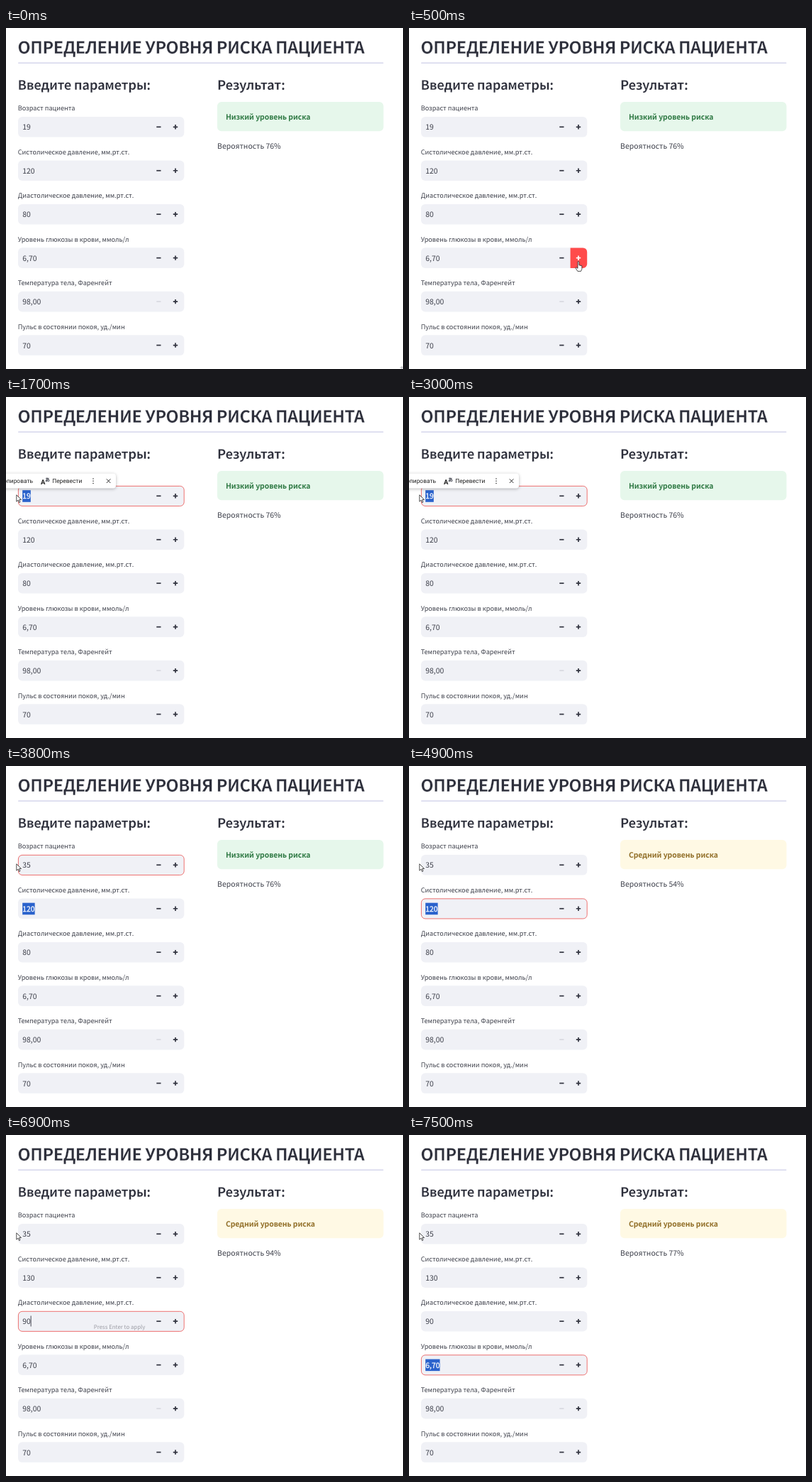
Recreate the animation shown at these times as an HTML page. Size 560x480 px, loop 8000 ms.

```html
<!DOCTYPE html>
<html lang="ru">
<head>
<meta charset="utf-8">
<title>Определение уровня риска</title>
<style>
html, body { margin: 0; width: 100%; height: 100%; overflow: hidden; background: #fff; }
svg { display: block; width: 560px; height: 480px; }
text {
  font: 10.48px "Noto Sans CJK SC", "Noto Sans CJK JP", "Noto Sans CJK", "Open Sans", sans-serif;
  fill: #3e404b; text-rendering: geometricPrecision; white-space: pre;
}
/* the thin white outline slims bold down to semibold */
.title, .head { font-weight: 600; fill: #2d2f3b; stroke: #fff; stroke-width: .3; }
.title { font-size: 23.55px; letter-spacing: -.0197em; }
.head { font-size: 18.35px; letter-spacing: -.0215em; }
.strong { font-weight: 600; letter-spacing: -.008em; }
.label { font-size: 9.17px; }
.hint { font-size: 7.85px; fill: #9c9da5; text-anchor: end; }
.menu { font: 8.4px Roboto, "Liberation Sans", sans-serif; fill: #222; }
.end { text-anchor: end; }
.sign { stroke: #31333f; stroke-width: 1.7; fill: none; }
.off { stroke: #d9dae0; }
.box { fill: #f0f1f6; }
.focus { fill: none; stroke: #ee6463; stroke-width: .9; }
.sel { fill: #2a62cc; }
.picked { fill: #fff; stroke: #fff; stroke-width: .25; }
.caret { stroke: #31333f; stroke-width: .9; }
.bar { filter: drop-shadow(0 1px 2px rgba(0, 0, 0, .28)); }
</style>
</head>
<body>
<svg id="stage" viewBox="0 0 560 480">
  <text class="title" x="16.6" y="36">ОПРЕДЕЛЕНИЕ УРОВНЯ РИСКА ПАЦИЕНТА</text>
  <rect x="17" y="48.4" width="515.5" height="1.7" rx=".8" fill="#d5d6ec"/>
  <text class="head" x="16.6" y="87">Введите параметры:</text>
  <text class="head" x="298" y="87">Результат:</text>
  <rect id="card" x="298" y="104" width="234.5" height="41.2" rx="5.8"/>
  <text id="level" class="strong" x="309.9" y="129"></text>
  <text id="odds" x="298" y="170"></text>
  <g id="fields"></g>

  <rect id="sel" class="sel" x="23.2" height="16.6"/>
  <text id="selText" class="picked" x="23.2"></text>
  <rect id="focus" class="focus" x="17.4" width="233.8" height="28.1" rx="5.6"/>
  <path id="caret" class="caret"/>
  <text id="hint" class="hint" x="196.4">Press Enter to apply</text>

  <g id="hover">
    <path d="M227.6 309.4h17.8a5.8 5.8 0 0 1 5.8 5.8v17a5.8 5.8 0 0 1 -5.8 5.8h-17.8z" fill="#ff4b4b"/>
    <path class="sign" style="stroke:#fff" d="M235.8 323.7h6.4m-3.2 -3.2v6.4"/>
  </g>

  <g id="menu">
    <rect class="bar" x="-60" y="107.8" width="215" height="20.7" rx="4" fill="#fff"/>
    <text class="menu end" x="38" y="121">Копировать</text>
    <text class="menu" x="65.2" y="121">Перевести</text>
    <text class="menu" x="49" y="123.4" style="font-size:9.5px;font-weight:700">A</text>
    <text x="55" y="119" style="font-size:7px;font-weight:700">あ</text>
    <g fill="#222"><circle cx="123" cy="115" r=".75"/><circle cx="123" cy="118.2" r=".75"/><circle cx="123" cy="121.4" r=".75"/></g>
    <path d="M141.8 115.4l5.6 5.6m0 -5.6l-5.6 5.6" stroke="#222" stroke-width=".95"/>
  </g>

  <path id="corner" d="M555.8 478h4.2M558.2 475.8v4.2" stroke="#a5a6ab" stroke-width=".8"/>
  <path id="beam" d="M-2.3 -5h1.6l.7 .6l.7 -.6h1.6M0 -4.4v8.8M-2.3 5h1.6l.7 -.6l.7 .6h1.6" fill="none" stroke="#444" stroke-width=".85"/>
  <path id="hand" d="M0 0c1.2 -1.2 1.9 0 1.9 .8v4l4 1v4.6l-1.4 3h-4.6l-3 -4.6c0 -1.4 1.6 -1 3.1 .6z" fill="#fff" stroke="#222" stroke-width=".8"/>
  <path id="arrow" d="M0 0v9.4l2.2 -2l1.5 3.4l1.5 -.7l-1.5 -3.3h3z" fill="#fff" stroke="#222" stroke-width=".8"/>
</svg>
<script>
const LOOP = 8000;
const $ = id => document.getElementById(id);
const rowTop = i => 125 + 61.45 * i;
const labels = [
  "Возраст пациента", "Систолическое давление, мм.рт.ст.",
  "Диастолическое давление, мм.рт.ст.", "Уровень глюкозы в крови, ммоль/л",
  "Температура тела, Фаренгейт", "Пульс в состоянии покоя, уд./мин"
];

$("fields").innerHTML = labels.map((label, i) => {
  const y = rowTop(i), mid = y + 14.3;
  return `<text class="label" x="16.7" y="${y - 8.6}">${label}</text>
    <rect class="box" x="17" y="${y}" width="234.3" height="28.6" rx="5.8"/>
    <text class="value" x="23.2" y="${y + 18.4}"></text>
    <path class="sign ${i === 4 ? "off" : ""}" d="M212.3 ${mid}h6.2"/>
    <path class="sign" d="M235.8 ${mid}h6.4m-3.2 -3.2v6.4"/>`;
}).join("");
const values = [...document.querySelectorAll(".value")];

const LOW = ["Низкий уровень риска", "#e6f7eb", "#307a45"];
const MID = ["Средний уровень риска", "#fff9e4", "#92702a"];

const start = {
  age: "19", sys: "120", dia: "80", sugar: "6,70", temp: "98,00", pulse: "70",
  level: LOW, odds: 76, focus: -1, sel: -1, hint: -1, caret: 0,
  menu: 0, hover: 0, cursor: "corner", at: [0, 0]
};

// Each step: time in ms and what changes then
const steps = [
  [400, { cursor: "hand", at: [238, 329], hover: 1 }],
  [700, { cursor: "beam", at: [110, 230], hover: 0 }],
  [800, { at: [70.5, 185] }],
  [1000, { at: [41.5, 146] }],
  [1200, { at: [37.2, 140.5] }],
  [1700, { cursor: "arrow", at: [14.8, 137.8], focus: 0, sel: 0, menu: 1 }],
  [3200, { age: "35", sel: -1, menu: 0, hint: 0, caret: 1 }],
  [3500, { caret: 0 }],
  [3800, { hint: -1, sel: 1 }],
  [4300, { focus: 1 }],
  [4400, { level: MID, odds: 54 }],
  [5600, { sys: "1", sel: -1, hint: 1, caret: 1 }],
  [5700, { sys: "130" }],
  [6000, { hint: -1, caret: 0, sel: 2 }],
  [6100, { focus: 2 }],
  [6300, { odds: 94 }],
  [6900, { dia: "90", sel: -1, hint: 2, caret: 1 }],
  [7300, { hint: -1, caret: 0, sel: 3 }],
  [7400, { focus: 3 }],
  [7500, { odds: 77 }]
];

const show = (id, on) => $(id).setAttribute("visibility", on ? "visible" : "hidden");

function draw(s) {
  const texts = [s.age, s.sys, s.dia, s.sugar, s.temp, s.pulse];
  values.forEach((v, i) => v.textContent = i === s.sel ? "" : texts[i]);

  const [name, back, ink] = s.level;
  $("level").textContent = name;
  $("level").style.fill = ink;
  $("card").setAttribute("fill", back);
  $("odds").textContent = `Вероятность ${s.odds}%`;

  show("focus", s.focus >= 0);
  $("focus").setAttribute("y", rowTop(s.focus) + .4);

  show("sel", s.sel >= 0);
  $("selText").textContent = texts[s.sel] || "";
  if (s.sel >= 0) {
    $("selText").setAttribute("y", rowTop(s.sel) + 18.4);
    $("sel").setAttribute("y", rowTop(s.sel) + 6.2);
    $("sel").setAttribute("width", $("selText").getComputedTextLength());
  }

  show("hint", s.hint >= 0);
  show("caret", s.caret);
  if (s.hint >= 0) {
    const y = rowTop(s.hint);
    const x = 23.5 + values[s.hint].getComputedTextLength();
    $("hint").setAttribute("y", y + 24.8);
    $("caret").setAttribute("d", `M${x} ${y + 6.6}v15`);
  }

  show("menu", s.menu);
  show("hover", s.hover);
  for (const id of ["corner", "beam", "hand", "arrow"]) show(id, id === s.cursor);
  if (s.cursor !== "corner") $(s.cursor).setAttribute("transform", `translate(${s.at})`);
}

let last = -1;
function tick() {
  const t = performance.now() % LOOP;
  const past = steps.filter(([at]) => at <= t);
  if (past.length !== last) {
    last = past.length;
    draw(Object.assign({}, start, ...past.map(p => p[1])));
  }
  requestAnimationFrame(tick);
}
tick();
</script>
</body>
</html>
```
